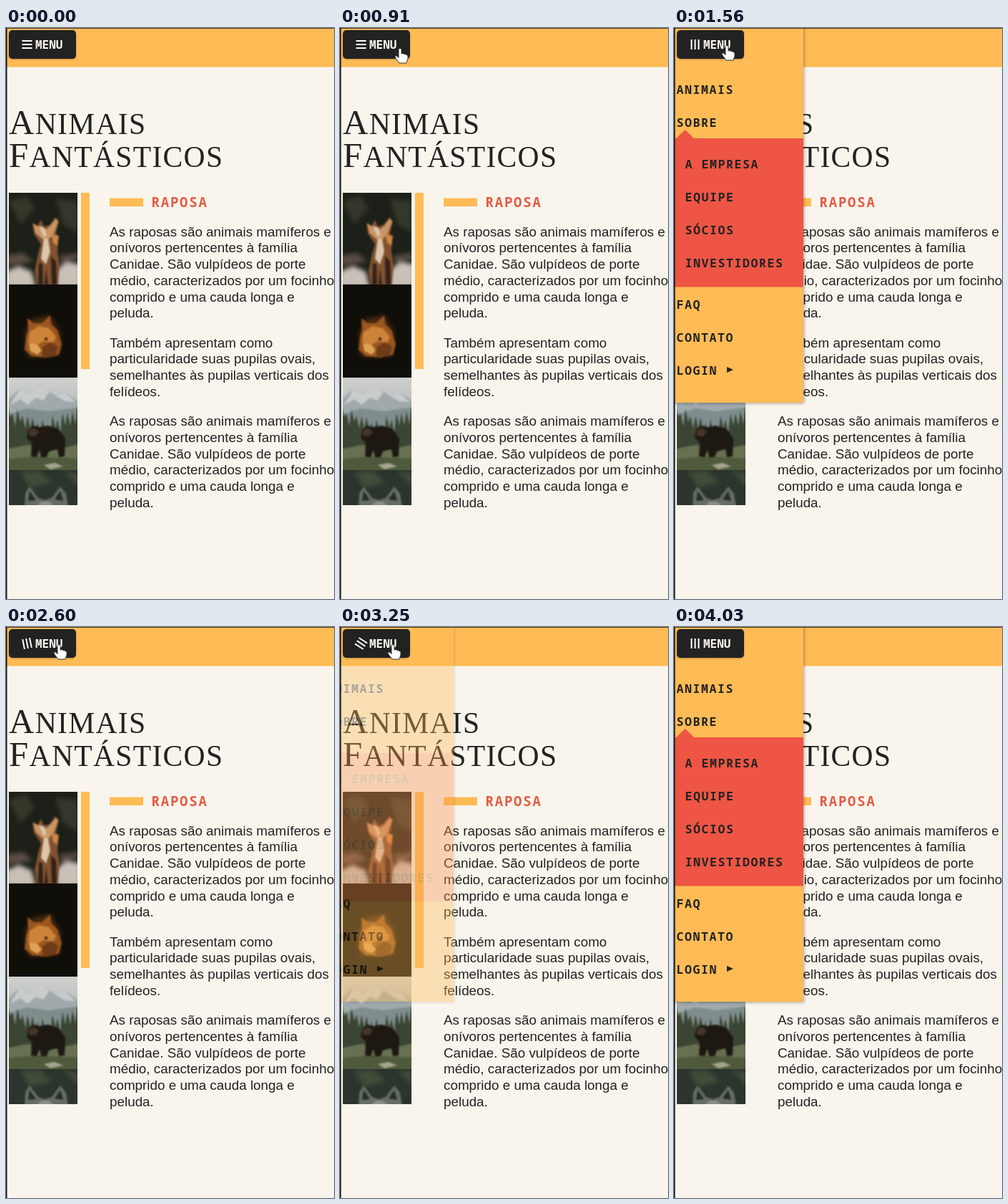
Write an HTML page that moves like this. It is 459 by 797 pixels and loops after 4810 ms.

```html
<!DOCTYPE html>
<html lang="pt-BR">
<head>
<meta charset="utf-8">
<title>Animais Fantásticos</title>
<style>
  html, body { margin: 0; width: 100%; height: 100%; overflow: hidden; background: #f9f5ed; }
  svg { display: block; width: 459px; height: 797px; }
  text { fill: #222; }
  .title { font: 49px 'Liberation Serif', serif; letter-spacing: 1.3px; }
  .title .small { font-size: 41.6px; }
  .copy { font: 18.85px 'Liberation Sans', Arial, sans-serif; }
  .mono { font: 700 16.5px 'Noto Sans Mono', monospace; letter-spacing: 1.6px; }
  .yellow { fill: #fb5; }
  .red { fill: #e54; }
  .panel { filter: drop-shadow(1px 1px 2px rgba(0, 0, 0, .35)); }
  .soft { filter: blur(.8px); }
  .softer { filter: blur(3px); }
</style>
</head>
<body>
<svg viewBox="0 0 459 797">
  <defs>
    <clipPath id="fox"><path d="M4 230h96v128H4z"/></clipPath>
    <clipPath id="squirrel"><path d="M4 358h96v130H4z"/></clipPath>
    <clipPath id="bear"><path d="M4 488h96v129H4z"/></clipPath>
    <clipPath id="wolf"><path d="M4 617h96v49H4z"/></clipPath>
    <linearGradient id="sky" x2="0" y2="1">
      <stop stop-color="#cfd1cf"/><stop offset=".5" stop-color="#a9b1b1"/>
    </linearGradient>
  </defs>

  <rect width="459" height="797" fill="#f9f5ed"/>
  <rect class="yellow" width="459" height="54.500"/>

  <text class="title" x="4" y="147.500">A<tspan class="small">NIMAIS</tspan></text>
  <text class="title" x="4" y="194">F<tspan class="small">ANTÁSTICOS</tspan></text>

  <g clip-path="url(#fox)">
    <path fill="#1d2018" d="M4 230h96v128H4z"/>
    <g class="softer">
      <path fill="#34382a" d="M4 242l24-8 12 18-20 22zM70 238l30 4v44l-20-12z"/>
      <path fill="#c9c0b8" d="M0 340l18-8 18 8 6 22H0zM70 338l14-12 20 4v32H70z"/>
      <path fill="#5a4d44" d="M0 318l24-4 14 12-36 6zM74 318l28-4v8l-24 6z"/>
    </g>
    <g class="soft">
      <path fill="#80522f" d="M37 272l7 4 5-8 4 9 8-2 8-11 5 6-4 16 3 8-1 19 3 18-3 28H43l-3-20 5-24 4-13-10-15z"/>
      <path fill="#c99565" d="M38 273l9 5 5 6 9-7 9-11 3 4-6 17-9 10-8-3-9-8z"/>
      <path fill="#dcc6ac" d="M46 276l8 3 3 11-5 1zM53 293l6 2 3 17-6 18-7-8z"/>
      <path fill="#cf8748" d="M64 288l10 2-2 14-6-4z"/>
      <path fill="#33211a" d="M46 328l5 2 1 28h-7zM63 318l7 8 1 32h-7zM56 336l3 22h-5z"/>
    </g>
  </g>

  <g clip-path="url(#squirrel)">
    <path fill="#100e09" d="M4 358h96v130H4z"/>
    <path class="softer" fill="#4a2a10" d="M27 424l10-18 25-5 14 24-2 32-44 2z"/>
    <g class="soft">
      <path fill="#99561f" d="M30 405l9 7 11 0 12-11 1 12 9 9 6 19-4 15-18 4-20-2-10-9 2-18 3-9z"/>
      <path fill="#cc8439" d="M33 424l13-8 14 3 10 12-4 9-12-3-14 7-9-6z"/>
      <path fill="#e0a255" d="M32 440l12 2 6 8-6 6-10-5z"/>
      <path fill="#6d3b17" d="M51 446l12-8 10 7-4 13-18 1z"/>
      <circle cx="56" cy="434" r="2" fill="#1d1008"/>
    </g>
  </g>

  <g clip-path="url(#bear)">
    <path fill="url(#sky)" d="M4 488h96v129H4z"/>
    <g class="soft">
      <path fill="#a0aaac" d="M0 520l19-16 13 8 17-13 20 14 14-4 20 13v40H0z"/>
      <path fill="#c8cdcc" d="M19 504l13 8 17-13 12 9-9 12-10-4-12 10-10-8-14 8zM69 513l14-4 14 13-14-1z"/>
      <path fill="#7f8d8d" d="M0 540l30-9 30 4 44-6v30H0z"/>
      <path id="trees" fill="#3b4533"/>
      <path fill="#687052" d="M0 588l30-6 40 6 34-7v45H0z"/>
      <path fill="#4f5a3c" d="M0 602l40-4 64 3v22H0z"/>
      <path fill="#a5a48e" d="M53 610l15-3 12 5-18 4z"/>
      <path fill="#1e1813" d="M31 561l7-6 8 2 13-2 15 5 9 13-1 25-8 1-2-11-12 3-3 8h-8l-2-10-4 10-8-1 1-19-7-7z"/>
      <path fill="#46362a" d="M32 562l7-4 7 5-5 7-9-1z"/>
    </g>
  </g>

  <g clip-path="url(#wolf)">
    <path fill="#2b352d" d="M4 617h96v49H4z"/>
    <path class="softer" fill="#414c3a" d="M20 620l26-2 18 16-30 8zM80 618l22 4v18z"/>
    <g class="soft">
      <path fill="#656d65" d="M26 668l1-19 6-9 12 16 9 3 10-3 12-16 8 10 3 18z"/>
      <path fill="#262c28" d="M31 660l2-14 9 13zM68 658l8-12 4 14z"/>
      <path fill="#8b9089" d="M42 668l8-7h10l8 7z"/>
    </g>
  </g>

  <path class="yellow" d="M105 230h12v246h-12zM145 237.500h47v11.500h-47z"/>
  <text class="mono" x="203.500" y="249.500" style="font-size:19px;letter-spacing:1.8px;fill:#e25c44">RAPOSA</text>
  <g id="copy" class="copy"></g>

  <g id="menu">
    <rect class="yellow panel" x="-40" y="-10" width="221" height="533"/>
    <g id="links" class="mono"></g>
    <path d="M74 473l9 4-9 4z" fill="#222"/>
    <g id="submenu">
      <path class="red" d="M-40 154H3l12.500-12L28 154h153v207.500H-40z"/>
      <g id="sublinks" class="mono"></g>
    </g>
  </g>

  <rect x="4" y="3" width="94" height="40" rx="5" fill="#222" style="filter:drop-shadow(0 1px 1px rgba(0,0,0,.25))"/>
  <path id="icon" d="M22.500 18h14m-14 5h14m-14 5h14" stroke="#fff" stroke-width="2"/>
  <text class="mono" x="41" y="28.800" style="font-size:16px;letter-spacing:0;fill:#f9f5ed">MENU</text>

  <path d="M0 0h459v.8H1.500V797H0z" fill="#15130f"/>

  <g id="cursor" fill="#fff" stroke="#333" stroke-width="1" stroke-linejoin="round">
    <path id="hand" d="M-2 1.500Q0-1 2 1.500V8Q4 6.500 5.500 8.500 7.500 7.500 8.500 9.500 11 9 11 11.500V15L9 21H-1L-7 13Q-7.500 10-4.500 11L-2 13.500Z"/>
    <path id="arrow" d="M0 0v16l4-3.500 2.500 6 2.500-1-2.500-6H12z"/>
  </g>
</svg>

<script>
const $ = id => document.getElementById(id);
const LOOP = 4810, STEP = 130;
const OPENED = 1130, CLOSED = 2564, REOPENED = 3180, DURATION = 300;
const SLIDE = 35;

function addLines(id, x, y, gap, lines) {
  lines.forEach((line, i) => {
    const text = document.createElementNS('http://www.w3.org/2000/svg', 'text');
    text.setAttribute('x', x);
    text.setAttribute('y', y + i * gap);
    text.textContent = line;
    $(id).append(text);
  });
}

const fox = ['As raposas são animais mamíferos e', 'onívoros pertencentes à família',
  'Canidae. São vulpídeos de porte', 'médio, caracterizados por um focinho',
  'comprido e uma cauda longa e', 'peluda.'];
addLines('copy', 145, 290.7, 22.75, fox);
addLines('copy', 145, 445.5, 22.75, ['Também apresentam como',
  'particularidade suas pupilas ovais,', 'semelhantes às pupilas verticais dos', 'felídeos.']);
addLines('copy', 145, 555, 22.75, fox);
addLines('links', 3.5, 91.7, 46, ['ANIMAIS', 'SOBRE']);
addLines('links', 3.5, 391.5, 46, ['FAQ', 'CONTATO', 'LOGIN']);
addLines('sublinks', 15.5, 195.5, 46, ['A EMPRESA', 'EQUIPE', 'SÓCIOS', 'INVESTIDORES']);

// Row of firs, taller towards both sides
let trees = 'M0 590V555';
for (let x = 2; x < 104; x += 7) {
  const top = 551 - Math.abs(x - 52) * .42 + 5 * Math.sin(x * 2.3);
  trees += `L${x} ${top}L${x + 4} ${top + 18}`;
}
$('trees').setAttribute('d', trees + 'V590z');

// CSS "ease": cubic-bezier(.25, .1, .25, 1)
function ease(x) {
  if (x <= 0) return 0;
  if (x >= 1) return 1;
  const bezier = (a, b, s) => 3 * a * s * (1 - s) ** 2 + 3 * b * s * s * (1 - s) + s ** 3;
  let low = 0, high = 1;
  for (let i = 0; i < 24; i++) {
    const mid = (low + high) / 2;
    if (bezier(.25, .25, mid) < x) low = mid; else high = mid;
  }
  return bezier(.1, 1, low);
}

const mix = (a, b, p) => a + (b - a) * p;

function cursorAt(t) {
  if (t < 260 || t >= 4030) return null;
  if (t < 1040) {
    const p = 1 - (1 - (t - 260) / 650) ** 2;
    return [mix(330, 84, p), mix(765, 28, p)];
  }
  const p = Math.max(0, (t - 3510) / 520) ** 1.5;
  return [mix(74, 400, p), mix(24, 765, p)];
}

function draw(t) {
  const start = t >= REOPENED ? REOPENED : OPENED;
  const open = t >= start && (t < CLOSED || t >= REOPENED);
  const shown = ease((t - start) / DURATION);
  const shift = SLIDE * (1 - shown);
  $('menu').style.display = open ? '' : 'none';
  $('menu').setAttribute('opacity', shown);
  $('menu').setAttribute('transform', `translate(${-shift} 0)`);
  $('submenu').setAttribute('opacity', shown);
  $('submenu').setAttribute('transform', `translate(0 ${shift})`);

  // The panel vanishes at once on closing; only the icon turns back
  const turn = open ? shown : t < OPENED ? 0 : 1 - ease((t - CLOSED) / DURATION);
  $('icon').setAttribute('transform', `rotate(${90 * turn} 29.5 23)`);

  const pos = cursorAt(t);
  $('cursor').style.display = pos ? '' : 'none';
  if (pos) {
    const onButton = pos[0] < 98 && pos[1] < 43;
    $('cursor').setAttribute('transform', `translate(${pos})`);
    $('hand').style.display = onButton ? '' : 'none';
    $('arrow').style.display = onButton ? 'none' : '';
  }
}

// The picture advances in steps of 130 ms
const begin = performance.now();
function tick() {
  const t = (performance.now() - begin) % LOOP;
  draw(Math.floor(t / STEP) * STEP);
  requestAnimationFrame(tick);
}
tick();
</script>
</body>
</html>
```
